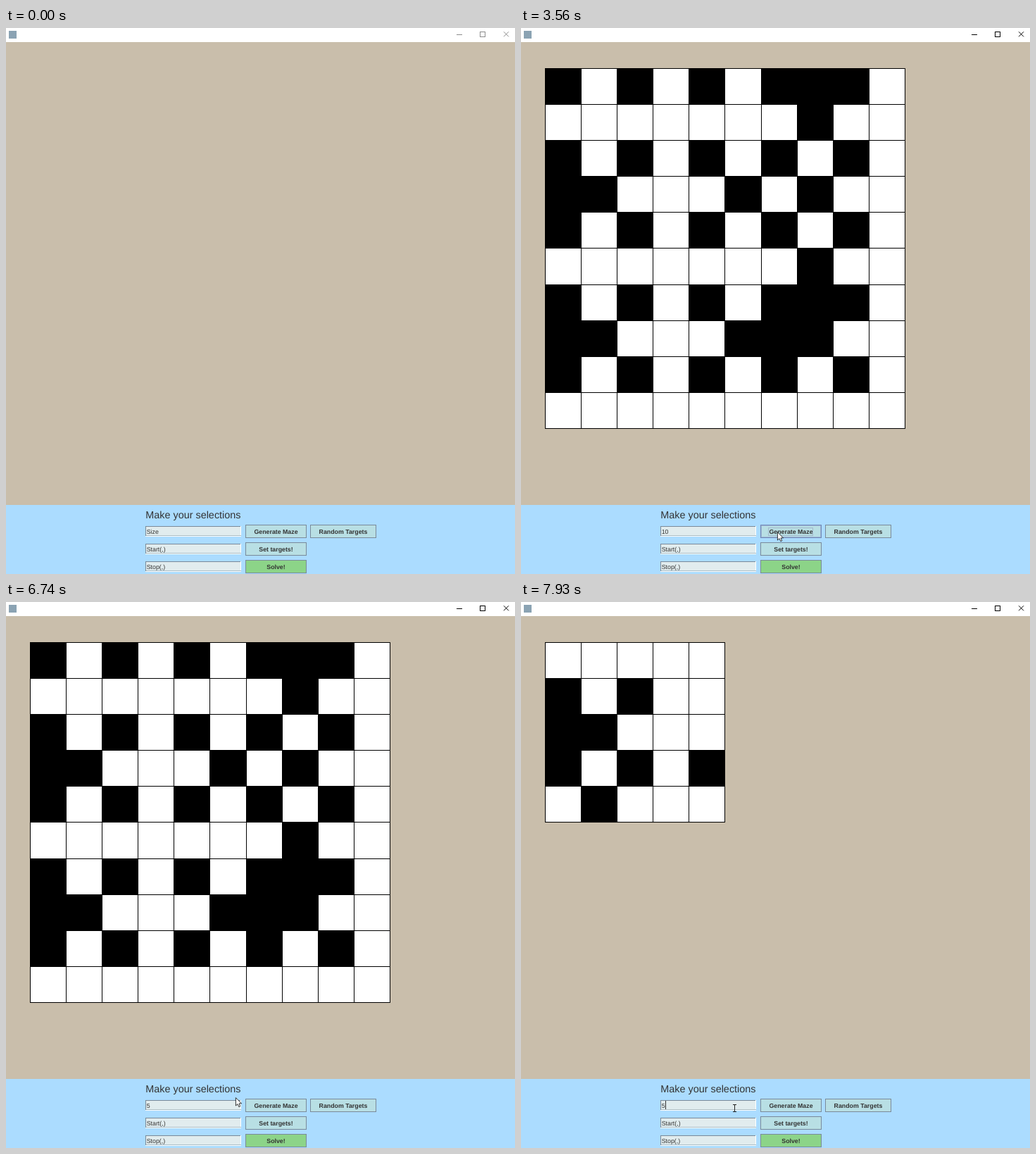
An HTML page that plays this animation: 723x775 px, repeating every 8000 ms.

```html
<!DOCTYPE html>
<html lang="en">
<head>
<meta charset="utf-8">
<title>Maze</title>
<style>
html, body { margin: 0; width: 100%; height: 100%; overflow: hidden; background: #c9beab; }
svg { display: block; width: 723px; height: 775px; }
text { font: 8.8px "Liberation Sans", Arial, sans-serif; fill: #333; text-rendering: geometricPrecision; white-space: pre; }
.bold { font-weight: bold; text-anchor: middle; }
.head { font-size: 14.4px; }
.crisp { shape-rendering: crispEdges; }
</style>
</head>
<body>
<svg id="stage" viewBox="0 0 723 775"></svg>
<script>
const NS = "http://www.w3.org/2000/svg";
const LOOP = 8000;
const stage = document.getElementById("stage");

function add(tag, attrs, parent = stage, label) {
  const node = document.createElementNS(NS, tag);
  for (const key in attrs) node.setAttribute(key, attrs[key]);
  if (label !== undefined) node.textContent = label;
  parent.appendChild(node);
  return node;
}
const box = (x, y, width, height, fill, parent) =>
  add("rect", { x, y, width, height, fill, class: "crisp" }, parent);
const frame = (x, y, width, height, stroke, parent) =>
  add("rect", { x: x + .5, y: y + .5, width: width - 1, height: height - 1, fill: "none", stroke, class: "crisp" }, parent);
const show = (node, on) => node.setAttribute("visibility", on ? "visible" : "hidden");

// Window and panel
box(0, 0, 723, 775, "#c9beab");
box(0, 0, 723, 20, "#fff");
box(4, 4, 11, 11, "#8ba3b3");
box(0, 677, 723, 98, "#abdcff");
const controls = add("g", { fill: "none" });
add("path", { d: "M640 9.5H648M673.5 5.5H680.5V12.5H673.5Z", class: "crisp" }, controls);
add("path", { d: "M707 5.3L714 12.3M714 5.3L707 12.3" }, controls);

// Mazes
function maze(rows) {
  const g = add("g", {});
  const n = rows.length;
  const at = (origin, i) => Math.round(origin + 51.1 * i - .05);
  const right = at(34, n), bottom = at(57, n);
  box(34, 57, right - 33, bottom - 56, "#fff", g);
  rows.forEach((row, r) => [...row].forEach((cell, c) => {
    const x = at(34, c), y = at(57, r);
    if (cell === "#") box(x, y, at(34, c + 1) - x, at(57, r + 1) - y, "#000", g);
  }));
  for (let i = 0; i <= n; i++) {
    box(at(34, i), 57, 1, bottom - 56, "#000", g);
    box(34, at(57, i), right - 33, 1, "#000", g);
  }
  return g;
}
const mazes = {
  10: maze(["#.#.#.###.", ".......#..", "#.#.#.#.#.", "##...#.#..", "#.#.#.#.#.",
            ".......#..", "#.#.#.###.", "##...###..", "#.#.#.#.#.", ".........."]),
  5: maze([".....", "#.#..", "##...", "#.#.#", ".#..."])
};

// Form
add("text", { x: 198.3, y: 695.6, class: "head" }, stage, "Make your selections");

function field(y) {
  box(198, y, 136, 15, "#fff");
  box(198, y, 135, 14, "#7a8a99");
  box(199, y + 1, 134, 13, "#e1ecee");
  box(199, y + 13, 135, 1, "#a9bcc6");
}
const fieldText = (y, label) => add("text", { x: 199.7, y }, stage, label);

field(707);
const selection = box(200, 708, 17, 12, "#b8cfe5");
const size = fieldText(718.1, "Size");
const caret = box(200, 708, 1, 12, "#333");
field(732);
fieldText(742.8, "Start(,)");
field(757);
fieldText(767.6, "Stop(,)");

function button(x, y, w, label, fill = "#b8dfe4") {
  const face = box(x, y, w, 19, fill);
  frame(x, y, w, 19, "#7a8a99");
  const hover = add("g", {});
  frame(x, y, w, 19, "#7188b4", hover);
  frame(x + 1, y + 1, w - 2, 17, "#9db6d6", hover);
  const press = add("g", {});
  box(x + 1, y + 1, w - 2, 1, "#8fa5bd", press);
  box(x + 1, y + 1, 1, 17, "#8fa5bd", press);
  add("text", { x: x + w / 2, y: y + 13.1, class: "bold" }, stage, label);
  show(hover, false);
  show(press, false);
  return { face, hover, press };
}
const generate = button(340, 705, 87, "Generate Maze");
const focus = frame(351, 709, 64, 12, "#a3b8cc");
button(432, 705, 94, "Random Targets");
const targets = button(340, 730, 87, "Set targets!");
button(340, 755, 87, "Solve!", "#8cd488");

// Pointers
const halo = add("circle", { cx: 360, cy: 715, r: 9, fill: "#f2e52b", "fill-opacity": .75 });
const arrow = add("path", {
  d: "M.4.6V12L3 9.6L4.8 13.6L6.7 12.8L5 8.9H8.5Z",
  fill: "#fff", stroke: "#000", "stroke-width": .8
});
const beam = add("path", { d: "M-2.5 .5H2.5M0 .5V10.5M-2.5 10.5H2.5", fill: "none", stroke: "#222", class: "crisp" });

// Each step changes only the listed parts.
const steps = [
  [0, { text: "Size" }],
  [390, { targets: true }],
  [790, { targets: false, active: true, beam: [296.5, 711], caret: 217 }],
  [1180, { beam: null, arrow: [156, 718], select: 17, caret: 200 }],
  [1580, { arrow: [155, 718], caret: null }],
  [1970, { text: "", select: 0, caret: 200 }],
  [2370, { text: "10", caret: 210 }],
  [3160, { arrow: [337, 716], caret: null }],
  [3560, { arrow: [364, 715], maze: 10, hover: true, focus: true }],
  [3950, { arrow: null, beam: [286.5, 711], hover: false }],
  [4350, { beam: [228.5, 704], focus: false, caret: 210 }],
  [4750, { beam: null, arrow: [166, 709], select: 10, caret: 200 }],
  [5150, { caret: null }],
  [5540, { text: "", select: 0, caret: 200 }],
  [5940, { text: "5", caret: 205 }],
  [6740, { arrow: [326, 703], caret: null }],
  [7140, { arrow: [360, 713], press: true, focus: true }],
  [7530, { arrow: null, beam: [303.5, 713], press: false, maze: 5 }],
  [7930, { focus: false, caret: 205 }]
];

function place(node, point) {
  show(node, point);
  if (point) node.setAttribute("transform", `translate(${point})`);
}

function render(time) {
  const s = Object.assign({}, ...steps.filter(([at]) => at <= time).map(([, change]) => change));
  controls.setAttribute("stroke", s.active ? "#000" : "#8c8c8c");
  for (const key in mazes) show(mazes[key], s.maze === +key);
  size.textContent = s.text;
  selection.setAttribute("width", s.select || 0);
  show(caret, s.caret);
  if (s.caret) caret.setAttribute("x", s.caret);
  show(targets.hover, s.targets);
  show(generate.hover, s.hover);
  show(generate.press, s.press);
  generate.face.setAttribute("fill", s.press ? "#b8cfe5" : "#b8dfe4");
  show(focus, s.focus);
  show(halo, s.press);
  place(arrow, s.arrow);
  place(beam, s.beam);
}

const start = performance.now();
function tick() {
  render((performance.now() - start) % LOOP);
  requestAnimationFrame(tick);
}
tick();
</script>
</body>
</html>
```
